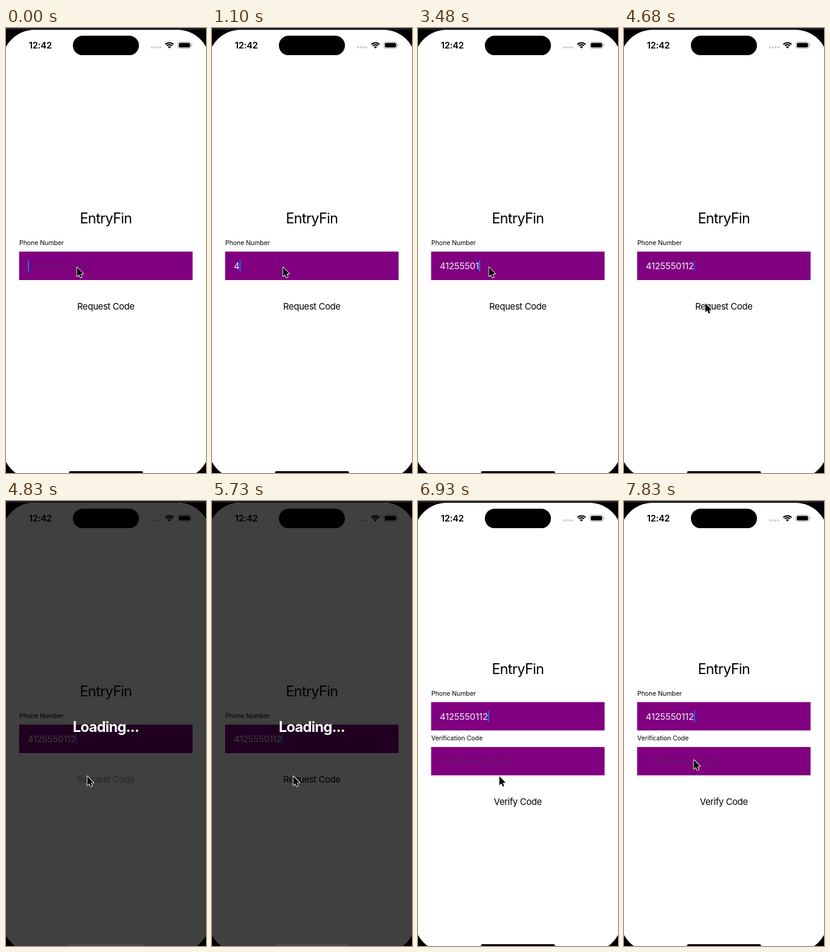
Write an HTML page with a canvas that moves like this. It is 331 by 738 pixels and loops after 8000 ms.

```html
<!DOCTYPE html>
<html lang="en">
<head>
<meta charset="utf-8">
<title>Phone sign-in</title>
<style>
html, body { margin: 0; width: 100%; height: 100%; overflow: hidden; background: #000; }
canvas { display: block; width: 331px; height: 738px; }
</style>
</head>
<body>
<canvas id="stage" width="331" height="738"></canvas>
<script>
const ctx = document.getElementById('stage').getContext('2d');
const LOOP = 8000;
const FAMILY = 'Inter, Roboto, "Liberation Sans", sans-serif';
const PURPLE = '#800080', BLUE = '#0a7aff', HINT = 'rgba(60,60,67,0.35)';
const NUMBER = '4125550112';
const KEY_TIMES = [950, 1250, 1690, 2290, 2590, 2880, 3330, 3480, 3780, 3930];
const LOAD_START = 4830, LOAD_END = 6930;
const SHIFT = 37.3;

// Pointer tip: [from time, x, y], each held until the next
const POINTER = [
  [0, 117.5, 396.8],
  [4080, 128, 430],
  [4230, 143.5, 477.5],
  [4380, 139, 466],
  [4530, 134.6, 456.4],
  [7380, 131, 450],
  [7530, 121, 436],
  [7680, 115.6, 429.4]
];

// Text styles: weight, size, letter spacing
const BODY = [400, 14.9, -0.37];
const DIGITS = [400, 14.9, -0.2];
const LABEL = [400, 10.5, -0.05];
const TITLE = [400, 23.6, -0.75];
const CLOCK = [600, 14.9, -0.3];
const LOADING = [700, 23.8, -0.8];

function setFont([weight, size, spacing]) {
  ctx.font = `${weight} ${size}px ${FAMILY}`;
  ctx.letterSpacing = spacing + 'px';
}

function text(str, x, y, style, color = '#000', align = 'left') {
  setFont(style);
  ctx.textAlign = align;
  ctx.fillStyle = color;
  ctx.fillText(str, x, y);
}

function centered(str, y, style, color) {
  text(str, 165.2, y, style, color, 'center');
}

function box(x, y, w, h, r, color) {
  ctx.fillStyle = color;
  ctx.beginPath();
  ctx.roundRect(x, y, w, h, r);
  ctx.fill();
}

function screen(color) {
  box(-6.5, 3, 344, 745, 54, color);
}

function wifi(x, y) {
  const from = -Math.PI * 0.75, to = -Math.PI * 0.25;
  ctx.strokeStyle = ctx.fillStyle = '#000';
  ctx.lineWidth = 2;
  for (const r of [9.6, 6.2]) {
    ctx.beginPath();
    ctx.arc(x, y, r, from, to);
    ctx.stroke();
  }
  ctx.beginPath();
  ctx.moveTo(x, y);
  ctx.arc(x, y, 3.6, from, to);
  ctx.fill();
}

function statusBar() {
  text('12:42', 56.8, 34, CLOCK, '#000', 'center');
  box(110.7, 12.8, 109.3, 32.3, 16.1, '#000');
  for (let i = 0; i < 4; i++) box(240 + i * 4.6, 30.6, 3.1, 3.1, 1, '#c8c8c8');
  wifi(270.5, 34);
  ctx.strokeStyle = '#a2a2a2';
  ctx.lineWidth = 1;
  ctx.beginPath();
  ctx.roundRect(284.5, 23.3, 21.6, 10.4, 3.2);
  ctx.stroke();
  box(286, 24.8, 18.6, 7.4, 2, '#000');
  box(307, 26.7, 1.2, 3.6, 0.6, '#a2a2a2');
}

function field(label, y, value) {
  text(label, 22, y - 10.8, LABEL);
  box(21.7, y, 287.1, 47.1, 0, PURPLE);
  if (value) text(value, 36, y + 29.4, DIGITS, 'rgba(255,255,255,0.93)');
  else text(label, 36, y + 29.4, BODY, HINT);
}

function caretAlpha(t) {
  if (t < 4380) return 1;
  if ((t - 4380) % 1050 < 300) return 0;
  return t < LOAD_START ? 0.5 : 1;
}

function caret(t, value, y) {
  setFont(DIGITS);
  ctx.globalAlpha = caretAlpha(t);
  box(36 + ctx.measureText(value).width, y + 14.2, 2, 19, 0.8, BLUE);
  ctx.globalAlpha = 1;
}

function form(t) {
  const verify = t >= LOAD_END;
  const up = verify ? SHIFT : 0;
  const value = NUMBER.slice(0, KEY_TIMES.filter(k => t >= k).length);
  const top = 370.8 - up;
  centered('EntryFin', 324 - up, TITLE);
  field('Phone Number', top, value);
  caret(t, value, top);
  if (verify) {
    field('Verification Code', 407.9, '');
    centered('Verify Code', 504.3, BODY);
  } else {
    const pressed = t >= LOAD_START && t < 4980;
    centered('Request Code', 467.2, BODY, pressed ? 'rgba(0,0,0,0.4)' : '#000');
  }
}

function pointer(t) {
  const [, x, y] = POINTER.filter(p => t >= p[0]).pop();
  const shape = [[0, 0], [0, 15], [3.4, 11.9], [5.6, 17], [8, 16], [5.8, 11], [10.4, 10.8]];
  ctx.beginPath();
  shape.forEach(([dx, dy]) => ctx.lineTo(x + dx, y + dy));
  ctx.closePath();
  ctx.lineJoin = 'round';
  ctx.lineWidth = 1.8;
  ctx.strokeStyle = '#fff';
  ctx.stroke();
  ctx.fillStyle = '#000';
  ctx.fill();
}

function draw(t) {
  const loading = t >= LOAD_START && t < LOAD_END;
  box(0, 0, 331, 738, 0, '#000');
  box(0, 0, 331, 3, 0, '#1c1a23');
  screen('#fff');
  statusBar();
  form(t);
  if (loading) {
    screen('rgba(0,0,0,0.75)');
    centered('Loading...', 383.4, LOADING, '#fff');
  }
  box(104.3, 735, 122.4, 4.4, 2.2, loading ? '#4e4e4e' : '#000');
  pointer(t);
}

function tick() {
  draw(performance.now() % LOOP);
  requestAnimationFrame(tick);
}
tick();
</script>
</body>
</html>
```
